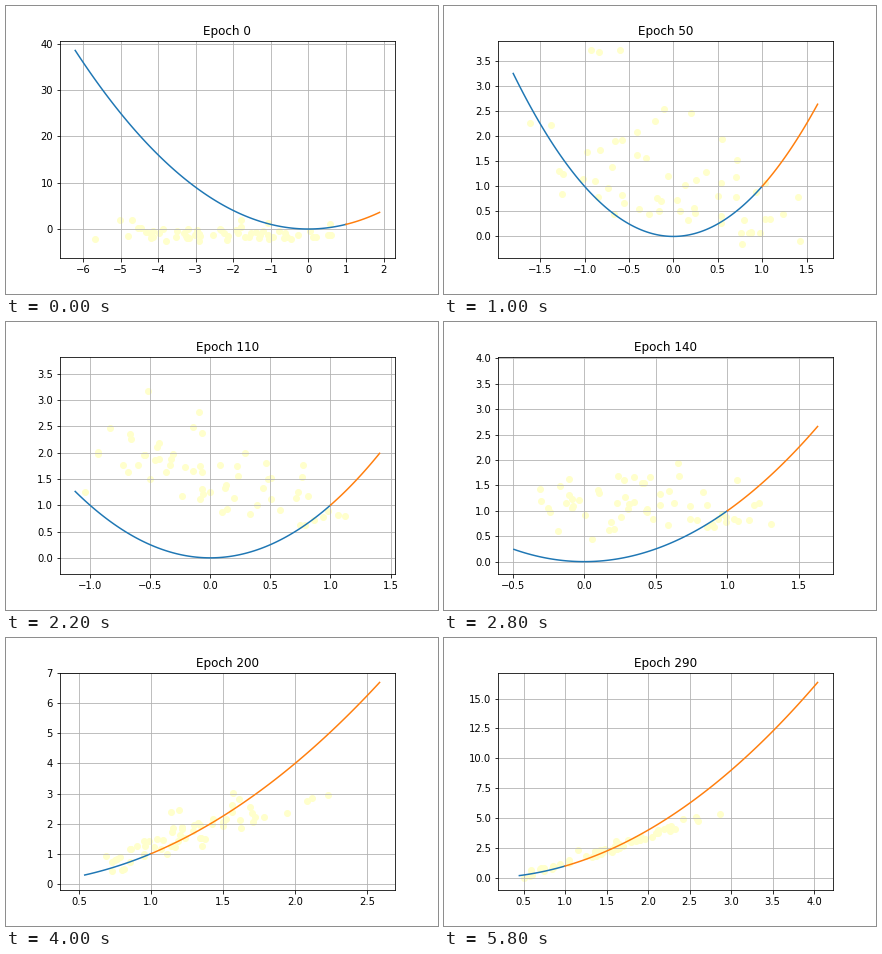
Recreate the animation shown at these times as a matplotlib script. Size 432 px wide and 288 px high, loop 6 s.

```python
import numpy as np
import matplotlib.pyplot as plt
from matplotlib.animation import FuncAnimation

FRAMES, STEP_MS = 30, 200
POINTS = 62
DOT = "#ffffcc"

# step, curve start, curve end, then the cloud's left, bottom and top
KEYS = np.array([
    [0, -6.207, 1.895, -6.207, -4.12, 2.00],
    [5, -1.803, 1.624, -1.803, -0.233, 3.71],
    [11, -1.123, 1.409, -1.123, -0.119, 3.635],
    [16, -0.070, 1.778, -0.078, -0.002, 3.975],
    [20, 0.540, 2.587, 0.474, 0.122, 4.60],
    [25, 0.655, 2.695, 0.575, 0.21, 4.60],
    [29, 0.450, 4.043, 0.376, -0.176, 7.40],
])


def smooth(t):
    t = np.clip(t, 0, 1)
    return t * t * (3 - 2 * t)


def cloud(step, left, right, bottom, top):
    """Samples that start as noise and settle along the rising curve."""
    rng = np.random.default_rng(100 + step)
    p = step / (FRAMES - 1)
    level = 1.35 - 2.2 * np.exp(-6 * p)
    slope = 2.7 * smooth((p - 0.35) / 0.5) - 0.5 * min(1, 6 * p)
    noise = 0.5 - 0.3 * p + 0.4 * np.exp(-8 * p)

    spread = rng.beta(2, 1.6 + 3 * p * p, POINTS)
    x = left + (right - left) * (0.02 + 0.95 * spread)
    y = level + slope * (x - 1) + noise * (rng.gumbel(size=POINTS) - 0.58)
    return x, np.clip(y, bottom + 0.02 * (top - bottom), top)


def draw(step):
    ax.clear()
    start, end, left, bottom, top = (
        np.interp(step, KEYS[:, 0], col) for col in KEYS.T[1:])

    ax.scatter(*cloud(step, left, end, bottom, top), color=DOT)
    for a, b in ((start, 1), (1, end)):
        x = np.linspace(a, b, 100)
        ax.plot(x, x**2)

    high = max(start**2, end**2, top)
    dx, dy = 0.05 * (end - left), 0.05 * (high - bottom)
    ax.set_xlim(left - dx, end + dx)
    ax.set_ylim(bottom - dy, high + dy)
    ax.grid()
    ax.set_title(f"Epoch {step * 10}")


fig, ax = plt.subplots(figsize=(6, 4), dpi=72)
fig.subplots_adjust(left=0.125, right=0.9, bottom=0.125, top=0.88)
anim = FuncAnimation(fig, draw, frames=FRAMES, interval=STEP_MS,
                     repeat=True, repeat_delay=0)
plt.show()
```
